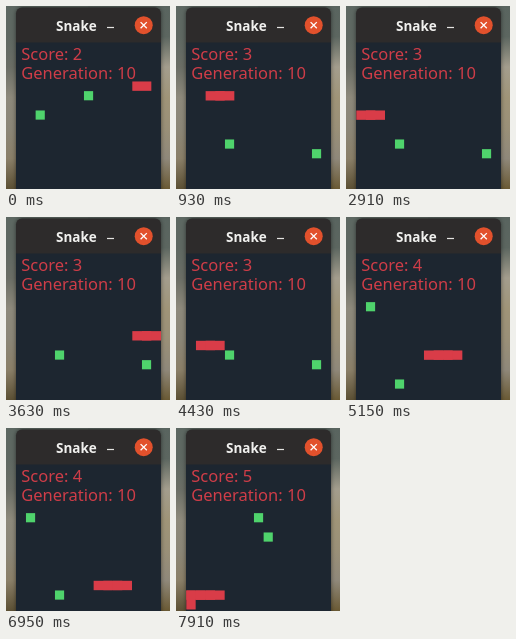
Recreate the animation shown at these times as an HTML page with a canvas. Size 164 px wide and 183 px high, loop 7990 ms.

```html
<!DOCTYPE html>
<html lang="en">
<head>
<meta charset="utf-8">
<title>Snake</title>
<style>
  html, body { margin: 0; width: 100%; height: 100%; overflow: hidden; background: #5d6862; }
  canvas { display: block; width: 164px; height: 183px; }
</style>
</head>
<body>
<canvas id="stage"></canvas>
<script>
const WIDTH = 164, HEIGHT = 183, LOOP = 7990;
const COLS = 15, CELL = 145 / COLS, LEFT = 10.3, TOP = 36.8;
const START = 73; // head position along the zigzag path

// Pace of the snake: [picture number, steps taken so far]
const PACE = [[0, 0], [12, 14], [29, 36], [46, 61], [56, 75], [75, 101], [100, 137]];

// Each meal moves both pieces of food and adds one cell: head position, score, food cells
const MEALS = [
  { at: 0, score: 2, food: [[7, 5], [2, 7]] },
  { at: 82, score: 3, food: [[4, 10], [13, 11]] },
  { at: 154, score: 4, food: [[1, 5], [4, 13]] },
  { at: 205, score: 5, food: [[7, 5], [8, 7]] },
];

const canvas = document.getElementById('stage');
const ctx = canvas.getContext('2d');
const scale = window.devicePixelRatio || 1;
canvas.width = WIDTH * scale;
canvas.height = HEIGHT * scale;
ctx.scale(scale, scale);

function headAt(time) {
  const tick = Math.min(100, Math.floor((time + 22) / 79.3));
  const i = Math.max(1, PACE.findIndex(([t]) => t >= tick));
  const [t0, s0] = PACE[i - 1], [t1, s1] = PACE[i];
  return START + Math.round(s0 + (s1 - s0) * (tick - t0) / (t1 - t0));
}

// Rows run alternately right and left
function pathCell(index) {
  const row = Math.floor(index / COLS), step = index % COLS;
  return [row % 2 ? COLS - 1 - step : step, row];
}

function fillRun(cells, color, gap) {
  const cols = cells.map(cell => cell[0]), rows = cells.map(cell => cell[1]);
  const col = Math.min(...cols), row = Math.min(...rows);
  ctx.fillStyle = color;
  ctx.fillRect(LEFT + col * CELL, TOP + row * CELL,
    (Math.max(...cols) - col + 1) * CELL - gap, (Math.max(...rows) - row + 1) * CELL - gap);
}

// Overlapping pairs of neighbours keep the body free of seams
function drawSnake(head, length) {
  for (let i = 1; i < length; i++) {
    fillRun([pathCell(head - i + 1), pathCell(head - i)], '#d93c48', 0.3);
  }
}

function text(string, x, y, font, color) {
  ctx.font = font;
  ctx.fillStyle = color;
  ctx.fillText(string, x, y);
}

function line(x0, y0, x1, y1, width) {
  ctx.lineWidth = width;
  ctx.beginPath();
  ctx.moveTo(x0, y0);
  ctx.lineTo(x1, y1);
  ctx.stroke();
}

function strip(x, width, colors) {
  const gradient = ctx.createLinearGradient(0, 0, 0, HEIGHT);
  colors.forEach((color, i) => gradient.addColorStop(i / (colors.length - 1), color));
  ctx.fillStyle = gradient;
  ctx.fillRect(x, 0, width, HEIGHT);
}

function drawWindow() {
  strip(0, 82, ['#5d6862', '#5f6862', '#6a6d65', '#8d897b', '#8b8677', '#8a7f68', '#5c5034']);
  strip(82, 82, ['#59645f', '#5c6660', '#a39d8d', '#9f9478', '#9a9078', '#8f887a', '#6a5a34']);

  ctx.save();
  ctx.shadowColor = 'rgba(0, 0, 0, .5)';
  ctx.shadowBlur = 4 * scale;
  ctx.fillStyle = '#2d2b2b';
  ctx.beginPath();
  ctx.roundRect(10, 1.5, 145, 200, 6);
  ctx.fill();
  ctx.restore();

  ctx.fillStyle = '#1d2630';
  ctx.fillRect(10, 36.5, 145, HEIGHT - 36.5);

  text('Snake', 50, 24.7, 'bold 13.5px "Noto Sans", sans-serif', '#f0f0ee');
  ctx.strokeStyle = '#e4e4e2';
  line(101, 21.5, 108, 21.5, 1.2);

  ctx.fillStyle = '#e2512c';
  ctx.beginPath();
  ctx.arc(137.7, 19.2, 9, 0, Math.PI * 2);
  ctx.fill();
  ctx.strokeStyle = '#fff';
  line(134.6, 16.1, 140.8, 22.3, 1.3);
  line(140.8, 16.1, 134.6, 22.3, 1.3);
}

function draw(time) {
  const head = headAt(time);
  const { score, food } = MEALS.filter(meal => meal.at <= head).pop();

  drawWindow();
  drawSnake(head, score);
  food.forEach(cell => fillRun([cell], '#4fd36c', 0.5));

  const font = '16.5px "Noto Sans", sans-serif';
  text('Score: ' + score, 15.3, 54, font, '#cf3d48');
  text('Generation: 10', 15.3, 73, font, '#cf3d48');
}

function animate() {
  draw(performance.now() % LOOP);
  requestAnimationFrame(animate);
}
animate();
</script>
</body>
</html>
```
